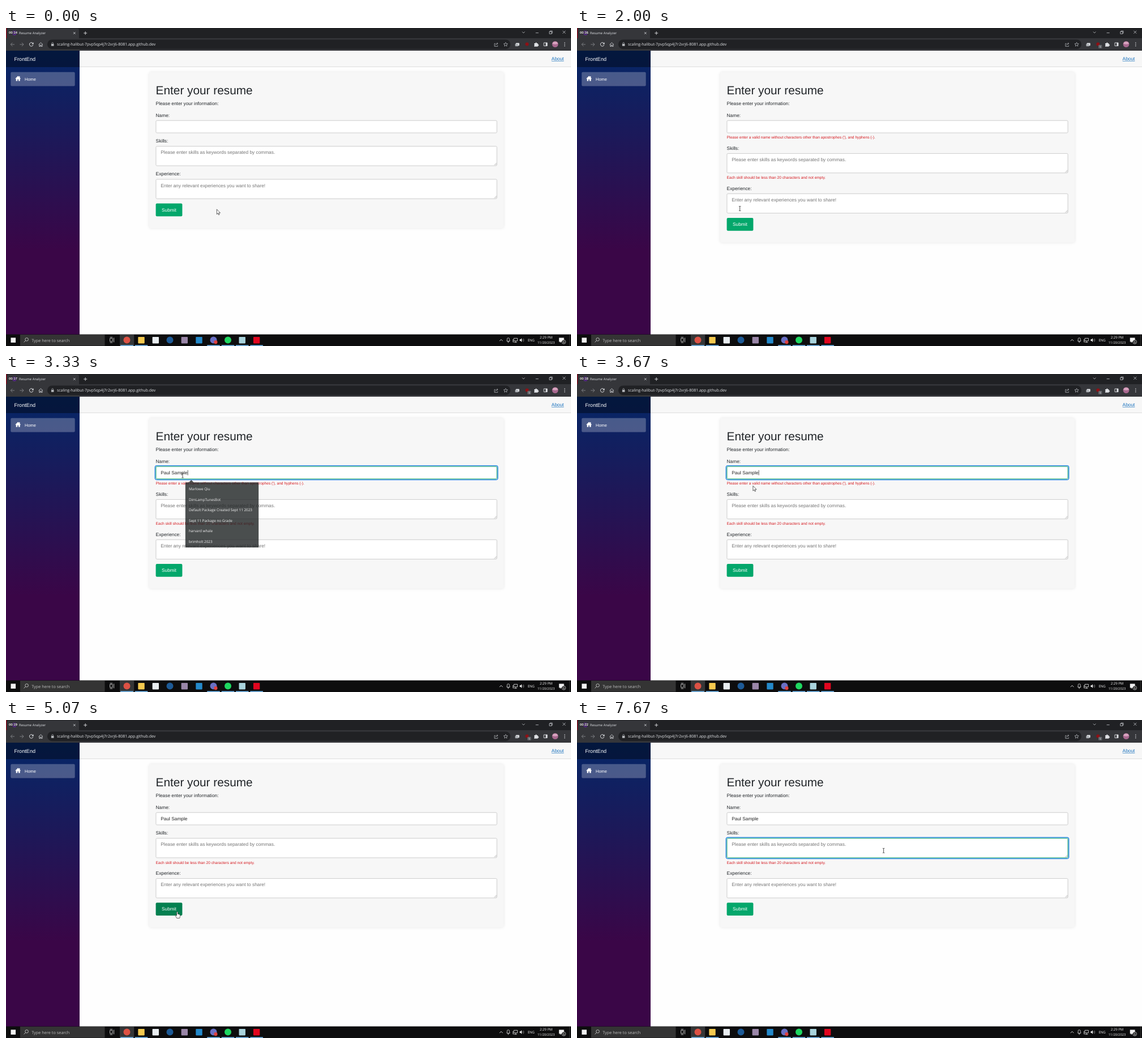
An HTML page that plays this animation: 998x561 px, repeating every 8 s.

```html
<!DOCTYPE html>
<html lang="en">
<head>
<meta charset="utf-8">
<title>Resume form</title>
<style>
  html, body { margin: 0; width: 100%; height: 100%; overflow: hidden; background: #fefefe; }
  svg { display: block; width: 100%; height: 100%; }
  text { font-family: "Liberation Sans", Arial, sans-serif; text-rendering: geometricPrecision; white-space: pre; }
  .ui { font-family: "Open Sans", "Noto Sans", sans-serif; }
  #card { filter: drop-shadow(0 0 2.6px rgba(0, 0, 0, .1)); }
</style>
</head>
<body>
<svg id="stage" viewBox="0 0 998 561" preserveAspectRatio="none"></svg>
<script>
const LOOP = 8000, STEP = 1000 / 15;
const ROW = 12.7; // height of one validation message
const INK = '#212529', PALE = '#dfe1e5';

const rect = (x, y, w, h, fill, rx = 0, more = '') =>
  `<rect x="${x}" y="${y}" width="${w}" height="${h}" fill="${fill}" rx="${rx}" ${more}/>`;
const dot = (x, y, r, fill, more = '') => `<circle cx="${x}" cy="${y}" r="${r}" fill="${fill}" ${more}/>`;
const line = (d, color = PALE, w = .8, more = '') =>
  `<path d="${d}" fill="none" stroke="${color}" stroke-width="${w}" ${more}/>`;
const shape = (d, fill, more = '') => `<path d="${d}" fill="${fill}" ${more}/>`;
const text = (x, y, size, str, fill = INK, more = '') =>
  `<text x="${x}" y="${y}" font-size="${size}" fill="${fill}" ${more}>${str}</text>`;
const ui = (x, y, size, str, fill = PALE, more = '') => text(x, y, size, str, fill, 'class="ui" ' + more);
const group = (id, body) => `<g id="${id}">${body}</g>`;

function field(y, h, id, hint = '') {
  const x = 264.9, w = 602.2;
  const grown = (d, fill) => rect(x - d, y - d, w + 2 * d, h + 2 * d, fill, 1.8 + d);
  return group(id + 'Ring', grown(2.3, '#1d7fe6') + grown(1, '#fff')) +
    rect(x, y, w, h, '#fff', 1.8, 'stroke="#c8c8c8" stroke-width=".9"') +
    rect(x, y, w, h, 'none', 1.8, `id="${id}Edge" stroke="#04aa6d" stroke-width=".9"`) +
    (hint && text(273.3, y + 13.6, 8.32, hint, '#757575') +
      line(`M862.5 ${y + h - 1}l4-4M864.7 ${y + h - 1}l1.8-1.8`, '#777', .5)) +
    rect(273.3, y + 6.4, .7, 9, '#111', 0, `id="${id}Caret"`);
}

function browser() {
  return rect(0, 0, 998, 19, '#202124') + rect(0, 0, 1.2, 18, '#a3152a') +
    shape('M2 19V4Q2 1 5 1H126Q129 1 129 4V19Z', '#35363a') +
    rect(0, 18, 998, 22, '#35363a') + rect(73, 20.4, 818, 16.8, '#202124', 8.4) +
    dot(15, 8.8, 4, '#5c2d91') +
    ui(23, 11, 5.9, 'Resume Analyzer') +
    line('M119 7.2l3.6 3.6M122.6 7.2l-3.6 3.6', PALE, .8) +
    line('M137.2 9h6M140.2 6v6', PALE, .9) +
    line('M911.8 6.6l2.3 2.3 2.3-2.3', PALE, .7) +
    line('M935.6 8.6h5', PALE, .7) +
    line('M959.8 6.3h4v4h-4zM961 6.3V5.2h4v4h-1.2', PALE, .7) +
    line('M983.3 4.8l5 5M988.3 4.8l-5 5', PALE, .7) +
    line('M15 29H8.4M11.5 25.8L8.3 29l3.2 3.2M24.4 29H31M27.9 25.8l3.2 3.2-3.2 3.2', '#85878b', .9) +
    line('M47.4 26.9a3.3 3.3 0 1 0 .5 2.9', PALE, 1) + shape('M48.6 25.2v3.4h-3.4z', PALE) +
    line('M57.8 29.2l3.6-3.4 3.6 3.4M58.8 28.6v3.9h1.8v-2.3h1.6v2.3h1.8v-3.9', PALE, .8) +
    rect(79.9, 28, 4.6, 3.8, '#b4b7bb', .5) + line('M80.9 28v-1.2a1.3 1.3 0 0 1 2.6 0V28', '#b4b7bb', .7) +
    ui(90, 31.4, 6.95, 'scaling-halibut-7pvp5qp4j7r2xrj6-8081.app.github.dev', '#e4e6e9') +
    line('M864.6 27.4h-1.8v5h5.6v-1.8M864.8 30.4q.3-2.9 3.6-3M867 25.9l1.8 1.5-1.8 1.5', '#c3c6ca', .7) +
    line('M882.6 25.4l1 2.3 2.6.2-2 1.7.6 2.5-2.2-1.4-2.2 1.4.6-2.5-2-1.7 2.6-.2z', '#c3c6ca', .7) +
    rect(900.6, 26.6, 6, 4.6, '#e8eaed', .6) + rect(899.4, 28, 5.4, 4.2, '#aeb2b6', .6) +
    dot(920.3, 28.6, 3, '#8e1015') +
    group('badge', rect(921, 29.8, 6.4, 6, '#63666b', 1) + ui(922.7, 34.7, 5, '1', '#fff')) +
    shape('M933 27h2.2a1.2 1.2 0 1 1 2.3 0h2v2a1.2 1.2 0 1 1 0 2.3v1.4H933v-2a1.1 1.1 0 0 0 0-2z', PALE) +
    line('M950 26h6v5.6h-6z', PALE, .9) + rect(953.4, 26, 2.6, 5.6, PALE) +
    dot(970, 28.6, 5.4, '#a8688f') + shape('M965 27.4a5.4 5.4 0 0 1 10 0q-5 2.6-10 0z', '#d7a3bf') +
    [26, 28.8, 31.6].map(y => dot(986.8, y, .8, PALE)).join('') +
    text(5, 10.2, 5.9, '', '#fff', 'id="clock" font-weight="bold" stroke="#111" stroke-width=".8" paint-order="stroke"');
}

function page() {
  return rect(130, 40, 868, 501, '#fefefe') + rect(130, 40, 868, 28.6, '#f7f7f7') +
    rect(130, 68.3, 868, .7, '#d2d2d2') +
    rect(0, 40, 130, 501, 'url(#side)') + rect(0, 40, 130, 29, '#000', 0, 'opacity=".4"') +
    text(14.5, 57.6, 9.15, 'FrontEnd', '#fff') +
    rect(8.3, 77.8, 113.4, 24.6, '#fff', 2, 'opacity=".25"') +
    shape('M16.4 89.2L21.2 84.4l1.8 1.8v-1.2h1.4v2.6l1.6 1.6-.6.6-.7-.6v4.2h-2.6v-2.9h-1.8v2.9h-2.6v-4.2l-.7.6z', '#fff') +
    text(33, 92.6, 7.49, 'Home', '#fff') +
    text(963.6, 57.3, 8.32, 'About', '#1670bd') + rect(963.6, 58.2, 21.8, .6, '#1670bd') +
    rect(253, 78, 626, 275, '#f7f7f7', 4, 'id="card"') +
    text(264.6, 117.4, 20.8, 'Enter your resume') +
    text(264.6, 135.7, 8.32, 'Please enter your information:') +
    text(264.6, 156.6, 8.32, 'Name:') + field(163.2, 21.8, 'name') +
    text(273.3, 176.8, 8.32, 'Paul Sample', '#222', 'id="typed"') +
    text(264.6, 195.4, 6.656, "Please enter a valid name without characters other than apostrophes ('), and hyphens (-).", '#d51a20', 'id="nameErr"') +
    group('skills', text(264.6, 202.1, 8.32, 'Skills:') +
      field(208.7, 34.3, 'skill', 'Please enter skills as keywords separated by commas.') +
      text(264.6, 253.6, 6.656, 'Each skill should be less than 20 characters and not empty.', '#d51a20', 'id="skillErr"')) +
    group('rest', text(264.6, 260.2, 8.32, 'Experience:') +
      field(266.9, 34.3, 'exp', 'Enter any relevant experiences you want to share!') +
      rect(264.6, 309.6, 46.8, 22.7, '#04a56a', 2, 'id="button"') +
      text(288, 323.7, 8.32, 'Submit', '#fff', 'text-anchor="middle"'));
}

function popup() {
  const items = ['Marlowe Qiu', 'DimLampTunesBot', 'Default Package Created Sept 11 2023',
    'Sept 11 Package no Grade', 'harvard whale', 'brimholt 2023'];
  return group('popup', shape('M321.6 191l5-4.8 5 4.8z', '#1f2324') +
    rect(316, 190.5, 131, 116.3, '#1f2324', 1.6) +
    items.map((s, i) => ui(322.2, 204.6 + i * 18.72, 6.42, s, '#f1f1f1')).join(''));
}

function taskbar() {
  const apps = [ // centre, colour, round, running
    [213.5, '#dd5144', 1, 1], [239, '#f4c94f', 0, 1], [264.3, '#e9edf0', 0, 0], [289.5, '#1d5a96', 1, 0],
    [315.3, '#9a86a8', 0, 0], [341, '#2489ca', 0, 0], [366.5, '#6a6fc4', 1, 1], [392, '#1ed760', 1, 1],
    [417.2, '#a9d3dc', 0, 1], [442.6, '#e1061f', 0, 1]];
  const app = ([x, color, round, running]) =>
    (round ? dot(x, 550.6, 6, color) : rect(x - 5.7, 545, 11.4, 11.4, color, .8)) +
    (running ? rect(x - 11.3, 559.4, 22.6, 1.6, '#76b9ed') : '');
  return rect(0, 540.5, 998, 20.5, '#0d0d0e') +
    rect(8.5, 546.4, 8.6, 8.6, '#f2f2f2') +
    rect(25, 541, 149.5, 19.6, '#343434') +
    dot(36.6, 549.4, 2.8, 'none', 'stroke="#ddd" stroke-width=".8"') + line('M34.6 551.4l-3 3', '#ddd', .8) +
    ui(45.2, 553.5, 7.35, 'Type here to search', '#bcbcbc') +
    line('M183.6 547.6h4.6v5.4h-4.6zM190.6 546.4v8M183.6 545.6h4.6M183.6 555h4.6', '#ddd', .8) +
    rect(201, 541, 25.2, 20, '#353637') + apps.map(app).join('') +
    dot(370.4, 554.2, 3.1, '#e0413f') +
    line('M871.8 552.2l2.8-2.8 2.8 2.8', '#eee', .9) +
    rect(885.2, 546.8, 4, 6, 'none', 1.6, 'stroke="#e6e6e6" stroke-width=".8"') +
    line('M884 551.4q3.2 4.6 6.4 0M887.2 553.8v1.6', '#e6e6e6', .7) +
    line('M897 547.4h6.4v4.6H897zM900.2 552v2.4M898 554.6h4.4M895.6 549v5h2', '#e6e6e6', .8) +
    shape('M907.4 549.3h1.6l2-2v6.8l-2-2h-1.6z', '#e6e6e6') +
    line('M912.2 549q1.1 1.6 0 3.4M913.8 547.8q2 2.8 0 5.8', '#9b9b9b', .7) +
    ui(921.4, 553, 6.1, 'ENG', '#f0f0f0') +
    ui(954, 548.3, 6.05, '2:29 PM', '#f0f0f0', 'text-anchor="middle"') +
    ui(954, 557.4, 5.75, '11/20/2023', '#f0f0f0', 'text-anchor="middle"') +
    shape('M976.8 546.4h8.8v7h-5l-1.8 2v-2h-2z', '#f0f0f0') +
    dot(985.2, 553.8, 3.5, '#2a2a2a', 'stroke="#ddd" stroke-width=".6"') +
    ui(985.2, 555.7, 5, '5', '#fff', 'text-anchor="middle"') + rect(995, 541, .6, 20, '#4a4a4a');
}

const pointers =
  shape('M0 0V8.8L2 6.9 3.3 9.9 4.7 9.3 3.4 6.4H6.2Z', '#fff', 'id="arrow" stroke="#222" stroke-width=".7"') +
  shape('M-1 .8Q0-.8 1 .8V4.2Q2-.1 0 0M-1 .8Q0-.6 1 .8V4.1L3.2 4.4 5 5.2V8.4L4 11.4H-1L-3.2 7.6Q-3-.2 0 0Z', 'none', 'display="none"') +
  shape('M-1 7V.9Q0-.7 1 .9V4.1L2.4 4.2 3.7 4.7 5 5.4V8.3L4.1 11.4H-.8L-3 7.6Q-3.2 6.2-2 6.2Z', '#fff', 'id="hand" stroke="#222" stroke-width=".7"') +
  line('M-1.7-4H-.5L0-3.6.5-4H1.7M0-3.6V3.6M-1.7 4H-.5L0 3.6.5 4H1.7', '#222', .8, 'id="beam"');

document.getElementById('stage').innerHTML =
  `<defs><linearGradient id="side" x2="0" y2="1"><stop stop-color="#052767"/><stop offset=".7" stop-color="#3a0647"/></linearGradient></defs>` +
  page() + popup() + browser() + taskbar() + group('mouse', pointers);

const el = {};
document.querySelectorAll('[id]').forEach(n => el[n.id] = n);
const show = (id, on) => el[id].setAttribute('opacity', +on);
const move = (id, x, y) => el[id].setAttribute('transform', `translate(${x} ${y})`);
const smooth = u => u * u * (3 - 2 * u);

// Interpolates keys of the form [time, value, ...].
function track(t, keys, ease = u => u) {
  const i = keys.findIndex(k => k[0] > t);
  if (i === 0) return keys[0].slice(1);
  if (i < 0) return keys[keys.length - 1].slice(1);
  const a = keys[i - 1], b = keys[i], u = ease((t - a[0]) / (b[0] - a[0]));
  return a.slice(1).map((v, j) => v + (b[j + 1] - v) * u);
}

const path = [[70, 372.3, 319.8], [930, 290, 320], [1270, 287.7, 318.5], [2000, 287.7, 318.5], [2400, 312, 179],
  [3470, 312, 179], [4400, 302.5, 338.2], [5200, 302.5, 338.2], [5870, 421, 364], [6070, 421, 364],
  [6200, 488.5, 366.2], [6530, 590, 250], [6870, 554, 230], [6930, 541.6, 230.4]];
const hover = [[730, 0], [1000, 1], [1400, 1], [1600, 0], [4460, 0], [4730, 1], [5260, 1], [5530, 0]];
const nameFocus = [[2740, 0], [2940, 1], [3950, 1], [4150, 0]];
const skillFocus = [[7070, 0], [7370, 1]];
const popupFade = [[2590, 0], [2660, 1], [3267, 1], [3333, .8], [3467, 0]];
const blink = (t, from) => t >= from && Math.floor((t - from) / 500) % 2 === 0;
const mix = (a, b, u) => Math.round(a + (b - a) * u);

function draw(t) {
  const nameBad = t > 1390 && t < 4920, skillBad = t > 1390;
  const dy1 = nameBad ? ROW : 0, dy2 = dy1 + (skillBad ? ROW : 0);
  show('nameErr', nameBad);
  show('skillErr', skillBad);
  move('skills', 0, dy1);
  move('rest', 0, dy2);
  el.card.setAttribute('height', 275 + dy2);

  const pasted = t > 3260;
  const rings = { name: track(t, nameFocus)[0], skill: track(t, skillFocus)[0], exp: 0 };
  for (const id in rings) {
    show(id + 'Ring', rings[id]);
    show(id + 'Edge', rings[id]);
  }
  show('typed', pasted);
  show('nameCaret', t < 3950 && blink(t, pasted ? 3260 : 2590));
  el.nameCaret.setAttribute('x', pasted ? 273.6 + el.typed.getComputedTextLength() : 273.3);
  show('skillCaret', blink(t, 7120));
  show('expCaret', false);

  const fade = track(t, popupFade)[0], k = .94 + .06 * fade;
  show('popup', fade);
  el.popup.setAttribute('transform', `translate(381.5 248.5) scale(${k}) translate(-381.5 -248.5)`);

  const h = track(t, hover)[0];
  el.button.setAttribute('fill', `rgb(4 ${mix(167, 128, h)} ${mix(107, 80, h)})`);

  const [x, y] = track(t, path, smooth);
  const within = (top, height, left = 264.9, right = 867) => x > left && x < right && y > top && y < top + height;
  const onButton = within(309.6 + dy2, 22.7, 264.6, 311.4);
  const onField = within(163, 22) || within(208.7 + dy1, 34.3) || within(266.9 + dy2, 34.3);
  move('mouse', x, y);
  show('hand', onButton);
  show('beam', onField);
  show('arrow', !onButton && !onField);

  show('badge', t > 500);
  el.clock.textContent = '00:' + Math.floor(14.4 + t / 1000);
}

function tick() {
  const t = performance.now() % LOOP;
  draw(Math.min(Math.floor((t + 5) / STEP) * STEP, 7670));
  requestAnimationFrame(tick);
}
tick();
</script>
</body>
</html>
```
